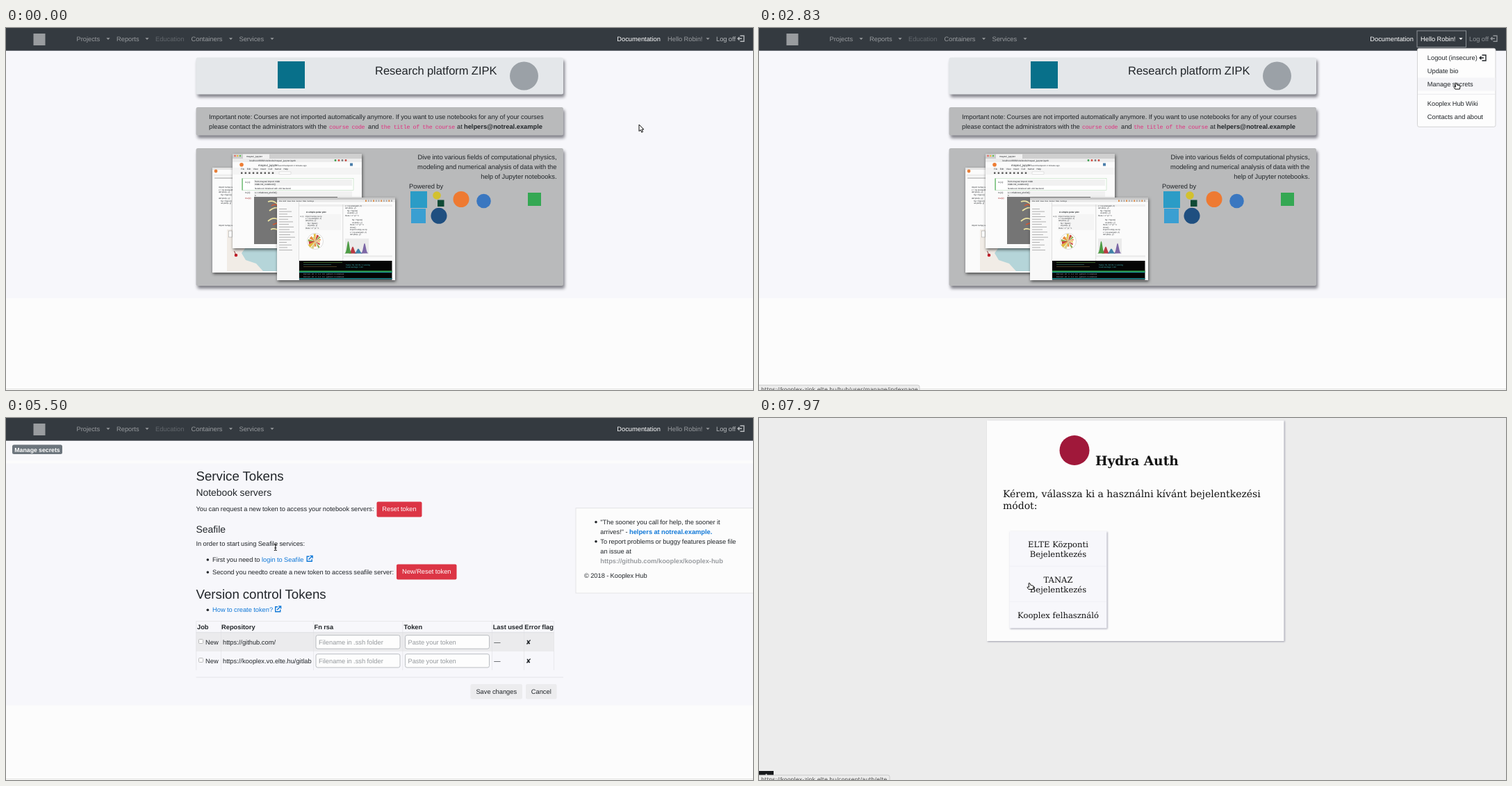
An HTML page that plays this animation: 1075x521 px, repeating every 8000 ms.

```html
<!DOCTYPE html>
<html lang="en">
<head>
<meta charset="utf-8">
<title>Managing secrets</title>
<style>
  html, body { margin: 0; width: 100%; height: 100%; overflow: hidden; background: #fcfcfc; }
  svg { display: block; width: 100vw; height: 100vh; }
  text { font-family: "Liberation Sans", Arial, sans-serif; font-size: 9.3px; word-spacing: -.26px;
         fill: #212529; text-rendering: geometricPrecision; white-space: pre; }
  .mono { font-family: "Liberation Mono", monospace; font-size: 8.2px; letter-spacing: -.23px; fill: #e0307f; }
  .b { font-weight: bold; }
  .serif { font-family: "DejaVu Serif", serif; word-spacing: 0; fill: #111; }
  .ui { font-family: "DejaVu Sans", sans-serif; font-size: 7.96px; word-spacing: 0; fill: #4a4a4a; }
  .nav { fill: #999c9f; }
  .w { fill: #fff; }
  .hint { fill: #95999d; }
  .link { fill: #1179d8; }
  .tiny { word-spacing: 0; }
  .panel { filter: drop-shadow(2.9px 4.6px 2px #808088); }
  .icon { fill: none; stroke-width: 1.4; }
</style>
</head>
<body>
<svg id="stage" viewBox="0 0 1075 521" preserveAspectRatio="none"></svg>
<script>
const DURATION = 8000;

const text = (x, y, str, cls = '', extra = '') => `<text x="${x}" y="${y}" class="${cls}" ${extra}>${str}</text>`;
const rect = (x, y, w, h, fill, extra = '') => `<rect x="${x}" y="${y}" width="${w}" height="${h}" fill="${fill}" ${extra}/>`;
const disc = (x, y, r, fill) => `<circle cx="${x}" cy="${y}" r="${r}" fill="${fill}"/>`;
const path = (d, stroke, width = 1, extra = 'fill="none"') => `<path d="${d}" stroke="${stroke}" stroke-width="${width}" ${extra}/>`;
const group = (id, body) => `<g id="${id}">${body}</g>`;
const size = px => `style="font-size:${px}px"`;
const middle = 'text-anchor="middle"';
const end = 'text-anchor="end"';

function seeded(seed) {
  return () => (seed = (seed * 16807) % 2147483647) / 2147483647;
}

// Small lines of code, cycling through a few statements
function code(x, y, count, step = 3.5, px = 2.9, start = 0) {
  const lines = ['import numpy as np', 'x = np.arange(0, 2)', 'def plot(x, y):', '    fig = figure()',
                 '    ax.plot(x, y)', 'theta = 2 * pi * n', 'show()'];
  return Array.from({ length: count }, (_, i) =>
    text(x, y + i * step, lines[(i + start) % lines.length], 'tiny', size(px))).join('');
}

function rose(cx, cy, r) {
  const rnd = seeded(77), colors = ['#e2b93b', '#c9463a', '#8fae52', '#e88a3c', '#d9cf8a'];
  let out = `<circle cx="${cx}" cy="${cy}" r="${r}" fill="#fff" stroke="#bbb" stroke-width=".5"/>`;
  for (let i = 0; i < 14; i++) {
    const a = i / 14 * 2 * Math.PI, b = a + .25 + rnd() * .35, l = r * (.55 + rnd() * .45);
    const p = v => `${cx + l * Math.cos(v)} ${cy + l * Math.sin(v)}`;
    out += `<path d="M${cx} ${cy}L${p(a)}L${p(b)}Z" fill="${colors[i % 5]}"/>`;
  }
  return out;
}

function hump(x, y, width, height, fill) {
  let d = `M${x - width * 3} ${y}`;
  for (let i = -3; i <= 3; i += .5) d += `L${x + i * width} ${y - height * Math.exp(-i * i / 2)}`;
  return `<path d="${d}Z" fill="${fill}"/>`;
}

const windowBox = (x, y, w, h) => rect(x, y, w, h, '#fbfbfb', 'style="filter:drop-shadow(1px 2px 2px rgba(0,0,0,.6))"');

function screenshots() {
  const back = windowBox(297, 201, 110, 151) + rect(297, 201, 110, 3, '#e4e4e4') +
    disc(302, 206, 2.4, '#e8803a') + rect(298, 210.5, 30, 3, '#eee') + rect(300, 215, 26, 2, '#ccc') +
    code(306, 230, 4) + code(306, 246, 3, 3.5, 2.9, 2) + code(306, 285, 1) +
    rect(318, 290, 80, 60, '#b5d5d9') +
    '<path d="M318 290h38l-12 13 4 9-9 12 6 10 15 5 10 11h-52Z" fill="#f1ece6"/>' +
    rect(320.5, 292, 5, 9, '#fff', 'stroke="#999" stroke-width=".5"') +
    disc(331, 327, 2.3, '#c8202c') + path('M328.5 321l2.5 6', '#7a1c20', .8);

  const lights = [329.5, 333.2, 337].map((x, i) => disc(x, 184, 1.2, ['#ee5c54', '#f1bd3c', '#5fc454'][i])).join('');
  const tools = Array.from({ length: 9 }, (_, i) => rect(338 + i * 5.6, 207.5, 2.4, 2.4, '#555')).join('');
  const mid = windowBox(326, 181, 186, 136) + rect(326, 181, 186, 7, '#cfcfcf') + lights +
    rect(341, 181.7, 38, 6.3, '#f2f2f2') + text(346, 186, 'mayavi_jupyter', 'tiny', size(3.4)) +
    rect(326, 188, 186, 5, '#ececec') + text(350, 191.7, 'localhost:8888/notebooks/mayavi_jupyter.ipynb', 'tiny', size(3.2)) +
    ['#3b9d4b', '#d8483b', '#7a7a7a', '#c8423a'].map((c, i) => disc(474 + i * 5, 190.5, 1.4, c)).join('') +
    disc(339, 196.8, 2.8, '#ee7d33') +
    text(363, 198.5, 'mayavi_jupyter', 'tiny', size(4.3)) + text(392, 198.5, 'Last Checkpoint: 2 minutes ago', 'tiny', size(2.9)) +
    rect(495, 194.5, 4, 4, '#4a7eaa') + rect(326, 201, 186, 10, '#f4f4f4') +
    text(338, 204.3, 'File    Edit    View    Insert    Cell    Kernel    Help', 'tiny', size(3.2)) + tools +
    rect(393, 207, 17, 3.4, '#fff', 'stroke="#bbb" stroke-width=".4"') +
    rect(340, 216.5, 160, 17, '#fff', 'stroke="#a9d3ab" stroke-width=".5"') + rect(339.5, 216.5, 1.2, 17, '#58b25f') +
    rect(357, 218, 141, 9, '#f1f1f1') +
    text(344, 222.5, 'In [1]:', 'tiny', size(3.1)) +
    text(358, 222.3, 'from mayavi import mlab', 'tiny', size(3.3)) + text(358, 226, 'mlab.init_notebook()', 'tiny', size(3.3)) +
    text(358, 231.5, 'Notebook initialized with x3d backend.', 'tiny', size(3.1)) +
    text(344, 238, 'In [2]:', 'tiny', size(3.1)) + rect(357, 234.8, 141, 8, '#f1f1f1') +
    text(358, 238, 's = mlab.test_plot3d()', 'tiny', size(3.3)) + text(358, 241.7, 's', 'tiny', size(3.3)) +
    text(344, 246, 'Out[2]:', 'tiny', 'style="font-size:3.1px;fill:#a33"') + rect(357, 243, 120, 68, '#757575') +
    path('M377 250q8 -3 14 4M379 263q9 -7 14 -3M377 278q8 -7 15 -2M381 290q6 -3 12 2', '#efe6a4', 1.7) +
    path('M382 256q5 -4 9 0M384 283l8 -3', '#d35a35', 1.6);

  const icons = Array.from({ length: 11 }, (_, i) => rect(517 + i * 3.7, 247.5, 2, 2.5, i % 3 ? '#aaa' : '#db8a45')).join('');
  const files = Array.from({ length: 17 }, (_, i) => rect(393, 260 + i * 3.7, 11 + (i * 7) % 13, .9, '#aaa')).join('');
  const front = windowBox(390, 244, 170, 119) + rect(390, 244, 170, 3.5, '#c8c8c8') + rect(390, 247, 170, 3.5, '#e9e9e9') +
    text(393, 250, 'File  Edit  View  Run  Kernel  Tabs  Settings', 'tiny', size(2.6)) + icons +
    rect(390, 250.5, 31, 112, '#f8f8f8') + files + rect(421, 251, .6, 111, '#ccc') +
    rect(422, 254, 134, 3, '#eee') + rect(484.5, 254, .7, 81, '#ccc') +
    text(432, 265.5, 'A simple polar plot', 'tiny b', size(3.2)) + rect(430, 268, 52, 23, '#f5f5f5') +
    code(431, 271.5, 6, 3.4, 2.7) + text(423, 271.5, 'In [1]:', 'tiny', size(2.4)) + rose(445, 307, 11.5) +
    code(488, 257, 5, 3.4, 2.8, 1) + code(495, 277, 7, 3.5, 2.8, 3) +
    rect(488, 303, 34, 22, '#ebebeb') + hump(499, 324.5, 2, 10, '#b93a43') + hump(492.5, 324.5, 1.7, 18, '#4d9b44') +
    hump(507, 324.5, 2.2, 7, '#3f82a8') + hump(516, 324.5, 1.8, 15, '#7d67a6') +
    rect(485, 327, 71, 3, '#eee') + rect(422, 335, 133.5, 27.5, '#050505') +
    rect(428, 337, 56, .8, '#4c7a35') + rect(428, 340, 40, .8, '#2d5f57') + rect(428, 343, 48, .8, '#5c4a28') +
    text(489, 341.5, 'Tasks: 52, 84 thr; 1 running', 'tiny', 'style="font-size:2.9px;fill:#3cb4b8"') +
    text(489, 345.2, 'Load average: 1.42', 'tiny', 'style="font-size:2.9px;fill:#3cb4b8"') +
    rect(422, 349.3, 133.5, 1.7, '#2e9d48') + rect(422, 351, 133.5, 1.2, '#1d8f97') +
    [0, 1].map(i => text(428, 355.3 + i * 3.3, `${812 + i} root   20   0   1.4   0.${i}   python3 -m notebook`, 'tiny',
      'style="font-size:2.7px;fill:#aab"')).join('') +
    rect(422, 360, 133.5, 1.4, '#21949c');
  return back + mid + front;
}

const caret = (x, fill = '#999c9f') => `<path d="M${x - 2.6} 14.3h5.2l-2.6 2.7z" fill="${fill}"/>`;
const exitIcon = (x, y, stroke) =>
  path(`M${x + 3.5} ${y - 4}h5.5v8h-5.5M${x} ${y}h6M${x + 2.4} ${y - 2.2}l-2.2 2.2 2.2 2.2`, stroke, 1.4, 'class="icon"');
const openIcon = (x, y) =>
  path(`M${x + 4} ${y - 3.5}h-3.3v7h7v-3M${x + 3} ${y + 1}l5.4 -5.2M${x + 5} ${y - 4.4}h3.6v3.6`, 'currentColor', 1.3, 'class="icon"');

function navbar() {
  const entries = [['Projects', 101.5, 147], ['Reports', 159, 203], ['Containers', 266.5, 323.5], ['Services', 335.5, 383]];
  return rect(0, 0, 1075, 32.7, '#343a40') + rect(39.5, 8, 17, 17, '#999c9f') +
    entries.map(([label, x, c]) => text(x, 19, label, 'nav') + caret(c)).join('') +
    text(215, 19, 'Education', '', 'style="fill:#62676c"') + text(879.3, 19, 'Documentation', 'w') +
    group('hello', text(952, 19, 'Hello Robin!', '', 'style="fill:inherit"') + caret(1010, 'inherit')) +
    group('logoff', text(1022, 19, 'Log off', '', 'style="fill:currentColor"') + exitIcon(1053, 15.3, 'currentColor'));
}

const panel = (y, h, fill) => rect(273.5, y, 528.5, h, fill, 'rx="2.5" class="panel"');

function home() {
  const intro = ['Dive into various fields of computational physics,', 'modeling and numerical analysis of data with the',
                 'help of Jupyter notebooks.'];
  return rect(0, 32, 1075, 357, '#f7f7fb') +
    panel(42.5, 53, '#e4e7ea') + panel(114, 40.5, '#b9babb') + panel(173, 198, '#b9babb') +
    rect(391, 48, 39, 39, '#08708a') + text(531, 66.5, 'Research platform ZIPK', '', size(16.5)) + disc(745.5, 69, 20.5, '#9ba1a7') +
    text(292, 130.5, 'Important note: Courses are not imported automatically anymore. If you want to use notebooks for any of your courses') +
    text(292, 144.5, 'please contact the administrators with the') + text(465, 144.5, 'course code', 'mono') +
    text(521, 144.5, 'and') + text(539.2, 144.5, 'the title of the course', 'mono') + text(649, 144.5, 'at') +
    text(659, 144.5, 'helpers@notreal.example', 'b') +
    intro.map((s, i) => text(792.5, 188.5 + i * 14, s, '', `${end} ${size(9.4)}`)).join('') +
    text(580, 230.7, 'Powered by', '', size(9.4)) +
    rect(582, 235, 24, 24, '#2b9cc6') + disc(620, 241, 5.8, '#d3c12e') + rect(621, 247.5, 9.5, 9.5, '#0f4a35') +
    disc(655, 246.5, 11.5, '#ee7a32') + disc(687.5, 249, 10.3, '#3a77c0') + rect(751, 237, 19, 19, '#34a853') +
    rect(583, 260, 21, 21, '#3a9fd2') + disc(623, 270.3, 11.5, '#1f4f80') + screenshots();
}

function menu() {
  const items = [['Logout (insecure)', 46.3], ['Update bio', 65], ['Manage secrets', 83.5], ['Kooplex Hub Wiki', 112], ['Contacts and about', 130.7]];
  return rect(947, 4, 70.5, 23.5, 'none', 'stroke="#8b9095" stroke-width="1"') +
    rect(947.5, 29.3, 112.5, 113, '#fdfdfd', 'rx="2.5" stroke="#c9c9cb" stroke-width=".8"') +
    rect(948, 71.5, 111.5, 19, '#f5f5f8', 'id="hover"') + rect(948, 94.8, 111.5, .8, '#e4e5e8') +
    items.map(([s, y]) => text(961.8, y, s)).join('') + exitIcon(1037, 43, '#212529');
}

function tableRow(y, url) {
  const field = (x, hint) => rect(x, y - 9.8, 121, 19.4, '#fdfdfd', 'rx="2.5" stroke="#b4b7bb" stroke-width=".9"') +
    text(x + 4, y + 3.3, hint, 'hint');
  return rect(277.5, y - 4, 6, 6, '#fff', 'rx="1" stroke="#aaa" stroke-width=".8"') +
    text(287, y + 3.3, 'New') + text(312, y + 3.3, url) +
    field(446, 'Filename in .ssh folder') + field(574.5, 'Paste your token') +
    text(702.3, y + 3.3, '—') + text(748, y + 3.5, '✘', '', 'style="font-family:\'DejaVu Sans\',sans-serif"');
}

function secrets() {
  const button = (x, y, w, label) => rect(x, y, w, 22, '#dc3545', 'rx="2"') + text(x + w / 2, y + 13.7, label, 'w', middle);
  const plain = (x, w, label) => rect(x, 383, w, 21.5, '#ececee', 'rx="2"') + text(x + w / 2, 396.8, label, '', middle);
  const heads = [['Job', 275], ['Repository', 310], ['Fn rsa', 443.5], ['Token', 572.5], ['Last used', 700.7], ['Error flag', 746.3]];
  const columns = [273.5, 309, 442, 570.5, 699, 745, 788.3].map(x => rect(x, 292.5, .7, 70.5, '#e2e2e6')).join('');
  return rect(0, 32, 1075, 29, '#f8f8fb') + rect(0, 65.5, 1075, 348, '#f7f7fb') +
    rect(9, 38.5, 72, 13.5, '#6c757d', 'rx="2.5"') + text(45, 48.6, 'Manage secrets', 'w b', `${middle} ${size(8.75)}`) +
    text(273.5, 89.5, 'Service Tokens', '', size(18.7)) + text(273.5, 111.5, 'Notebook servers', '', size(13.9)) +
    text(273.5, 134, 'You can request a new token to access your notebook servers:') + button(533.5, 120.5, 65, 'Reset token') +
    text(273.5, 164.5, 'Seafile', '', size(13.9)) + text(273.5, 183.5, 'In order to start using Seafile services:') +
    disc(290.3, 204, 1.8, '#212529') + text(297, 207, 'First you need to') +
    group('login', text(368, 207, 'login to Seafile', '', 'style="fill:currentColor"') + openIcon(432.5, 202.8) +
      rect(368, 208, 73, .7, 'currentColor', 'id="underline"')) +
    disc(290.3, 222, 1.8, '#212529') + text(297, 225, 'Second you needto create a new token to access seafile server:') +
    button(562, 210.5, 86.5, 'New/Reset token') +
    text(273.5, 260, 'Version control Tokens', '', size(18.7)) +
    disc(290.3, 276.3, 1.8, '#212529') + `<g color="#1179d8">${text(297, 279.3, 'How to create token?', 'link')}${openIcon(387, 275.3)}</g>` +
    rect(273.5, 309, 515, 27, '#ebebed') + columns + rect(273.5, 292.3, 515, .7, '#e2e2e6') + rect(273.5, 308.3, 515, .9, '#dcdde0') +
    heads.map(([s, x]) => text(x, 303.7, s, 'b')).join('') +
    tableRow(322.5, 'https://github.com/') + tableRow(349.5, 'https://kooplex.vo.elte.hu/gitlab') +
    rect(273.5, 372.7, 528.5, .8, '#dfdfe3') + plain(668.5, 74.5, 'Save changes') + plain(748, 44.5, 'Cancel') +
    rect(820, 129.7, 260, 122.3, '#fcfcfc', 'stroke="#dedfe2" stroke-width=".8"') +
    disc(849, 149.8, 1.8, '#212529') + text(855.3, 152.6, '"The sooner you call for help, the sooner it') +
    text(855.3, 166.6, 'arrives!" -') + text(897, 166.6, 'helpers at notreal.example.', 'b link') +
    disc(849, 177.8, 1.8, '#212529') + text(855.3, 180.6, 'To report problems or buggy features please file') +
    text(855.3, 194.6, 'an issue at') + text(855.3, 208.6, 'https://github.com/kooplex/kooplex-hub', 'b', 'style="fill:#999ca0"') +
    text(832, 230.2, '© 2018 - Kooplex Hub');
}

function auth() {
  const option = (y, s) => text(430.5, y, s, 'serif', `${middle} ${size(11.6)}`);
  const lift = 'style="filter:drop-shadow(1px 1px 1px rgba(60,60,90,.45))"';
  return rect(0, 0, 1075, 521, '#ececec') + rect(328, 3.5, 427.5, 317.5, '#fcfcfc', lift) +
    disc(454, 46.5, 21.5, '#a0183a') + text(484, 68, 'Hydra Auth', 'serif b', size(18.6)) +
    text(351, 114, 'Kérem, válassza ki a használni kívánt bejelentkezési', 'serif', size(14)) +
    text(351, 131, 'módot:', 'serif', size(14)) +
    rect(360.5, 163, 140, 139.5, '#f7f7fb', lift) + rect(361, 212.7, 139, .8, '#eeeef3') + rect(361, 263.7, 139, .8, '#eeeef3') +
    option(185.5, 'ELTE Központi') + option(199.5, 'Bejelentkezés') + option(236.7, 'TANAZ') +
    option(250.7, 'Bejelentkezés') + option(288, 'Kooplex felhasználó') +
    rect(0, 508, 21, 13, '#17191c') + disc(10.5, 513.3, 1.1, '#fff');
}

const cursors =
  group('arrow', '<path d="M0 0V9.6l2.2-2 1.6 3.6 1.7-.8-1.6-3.4h3z" fill="#fff" stroke="#111" stroke-width="1"/>') +
  group('hand', '<path d="M-1.5 0q.8-1.2 1.8 0l1 2.600 3 .6q1.400.4 1.200 1.700l-.6 3.600h-6.500l-1.900-2.600q.1-1.300 1.400-.7l1.200.4z" fill="#fff" stroke="#111" stroke-linejoin="round"/>') +
  group('beam', path('M-2-4.3h1.5l.5.5.5-.5H2M0-4V4M-2 4.3h1.5l.5-.5.5.5H2M-1.5.8h3', '#111', 1));

const stage = document.getElementById('stage');
stage.innerHTML = rect(0, 0, 1075, 521, '#fcfcfc') + rect(0, 519, 1075, 1, '#e2e2e0') +
  group('home', home()) + group('secrets', secrets()) + group('nav', navbar()) + group('menu', menu()) +
  group('blank', rect(0, 0, 1075, 521, '#f6f6f6')) + group('auth', auth()) +
  group('status', '<path id="bar" fill="#ececec" stroke="#c6c6c6" stroke-width=".9"/>' + text(3, 522.6, '', 'ui', 'id="statusText"')) + cursors;

const el = id => document.getElementById(id);
const show = (id, on) => el(id).style.display = on ? '' : 'none';
const clamp = v => Math.max(0, Math.min(1, v));
const ease = v => v * v * (3 - 2 * v);

// Pointer stops: time, x, y
const STOPS = [[0, 911, 139], [900, 911, 139], [1620, 1008, 13.5], [2100, 1008, 13.5], [2430, 1003.5, 79.5], [3500, 1003.5, 79.5],
  [4350, 389, 183], [5250, 389, 183], [5830, 386, 191], [5900, 386, 197], [6070, 386, 197], [6400, 401, 201],
  [7780, 401, 201], [7960, 389.5, 238]];

function pointerAt(t) {
  const i = STOPS.findIndex(s => s[0] > t);
  if (i < 0) return STOPS[STOPS.length - 1].slice(1);
  const [t0, x0, y0] = STOPS[i - 1], [t1, x1, y1] = STOPS[i];
  const k = ease((t - t0) / (t1 - t0));
  return [x0 + (x1 - x0) * k, y0 + (y1 - y0) * k];
}

// Status bar: from, until, width, label, fade time
const STATUS = [
  [2430, 3400, 231, 'https://kooplex-zipk.elte.hu/hub/user/manage/indexpage', 120],
  [6540, 7200, 147, 'https://kooplex-zipk.elte.hu/seafile/', 220],
  [7200, 7780, 188, 'Transferring data from kooplex-zipk.elte.hu…', 1],
  [7780, 8000, 188, 'https://kooplex-zipk.elte.hu/consent/auth/elte', 1]
];

function update(t) {
  const onSecrets = t >= 3400, blank = t >= 7400, login = t >= 7770;
  const hoverHello = t >= 1580 && !onSecrets, hoverLink = t >= 6330;
  show('home', !onSecrets);
  show('secrets', onSecrets && !blank);
  show('nav', !blank);
  show('menu', t >= 2000 && !onSecrets);
  show('hover', t >= 2400);
  show('blank', blank && !login);
  show('auth', login);
  el('hello').style.fill = hoverHello ? '#fff' : '#999c9f';
  el('logoff').style.color = hoverHello ? '#8f9397' : '#b8bbbe';
  el('login').style.color = hoverLink ? '#0a58b0' : '#1179d8';
  show('underline', hoverLink);

  const note = STATUS.find(s => t >= s[0] && t < s[1]);
  show('status', note);
  if (note) {
    const [from, , width, label, fade] = note;
    el('status').style.opacity = clamp((t - from) / fade);
    el('bar').setAttribute('d', `M-1 514H${width - 2.5}q2.5 0 2.5 2.5V523H-1Z`);
    if (el('statusText').textContent !== label) el('statusText').textContent = label;
  }

  const [x, y] = pointerAt(t);
  const overMenu = t >= 1580 && t < 3550;
  const kind = overMenu || hoverLink ? 'hand' : t >= 4200 ? 'beam' : 'arrow';
  for (const id of ['arrow', 'hand', 'beam']) show(id, id === kind);
  el(kind).setAttribute('transform', `translate(${x} ${y})`);
}

const origin = performance.now();
function frame() {
  update((performance.now() - origin) % DURATION);
  requestAnimationFrame(frame);
}
frame();
</script>
</body>
</html>
```
